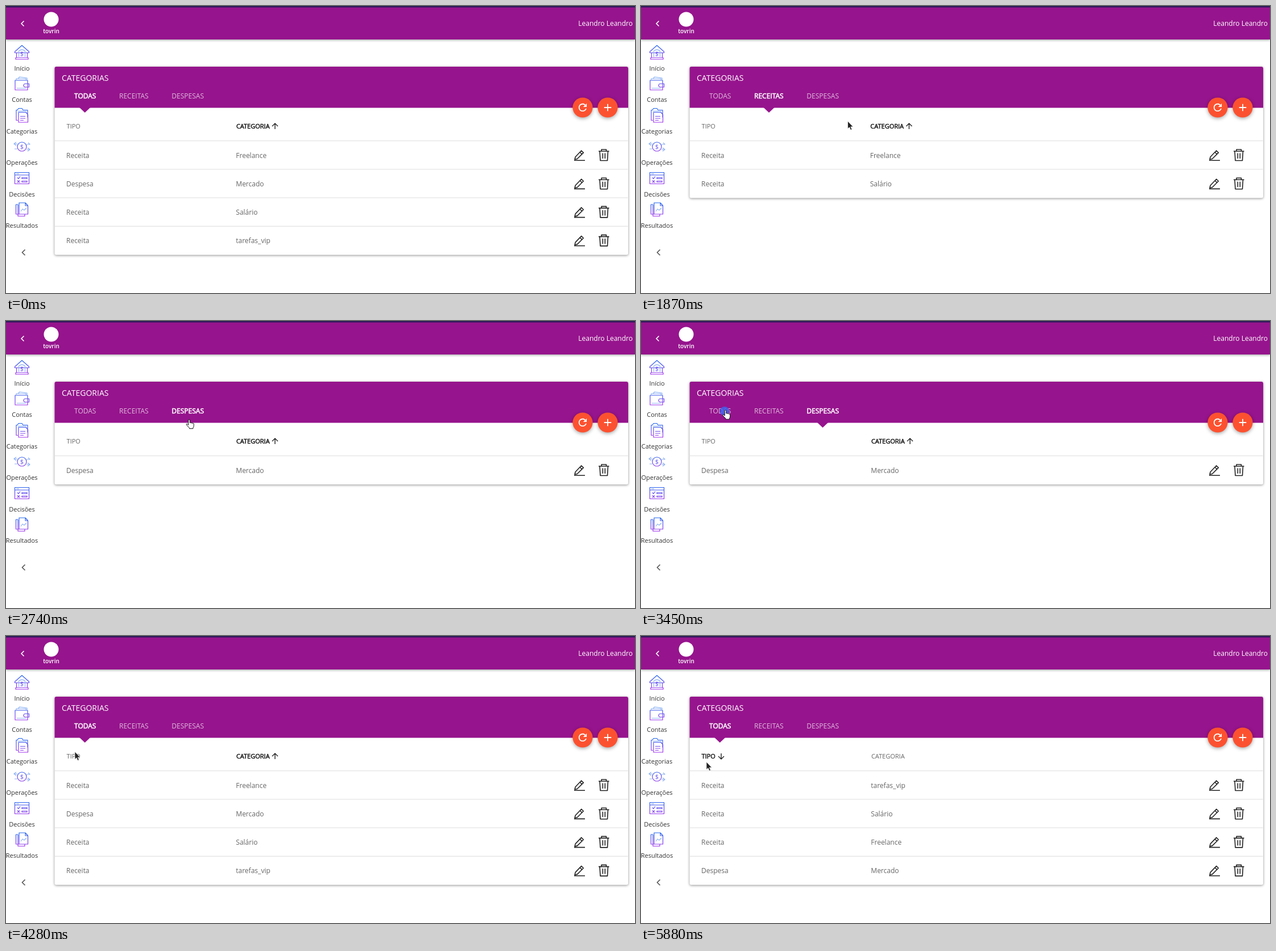
An HTML page for the animation above (6300 ms loop, 1106x506 px).

```html
<!DOCTYPE html>
<html lang="pt">
<head>
<meta charset="utf-8">
<title>Categorias</title>
<style>
html, body { margin: 0; width: 100%; height: 100%; overflow: hidden; background: #fff; }
svg { display: block; font-family: "Open Sans", "Noto Sans", sans-serif; font-size: 12px; }
.line { fill: none; stroke: #222; stroke-width: 1.6; stroke-linejoin: round; }
.side text { font-size: 11px; fill: #333; text-anchor: middle; }
.side path, .side circle { fill: none; stroke: url(#ink); stroke-width: 1.2; stroke-linejoin: round; }
.side .soft { stroke: #8fb4f5; }
.side .coin { font-size: 11px; fill: #6a5cf0; }
.tab { fill: #fff; opacity: .7; }
.tab.on { opacity: 1; stroke: #fff; stroke-width: .55px; }
.cell { fill: #666; }
.head { font-size: 11px; fill: #666; }
.head.on { fill: #111; stroke: #111; stroke-width: .45px; }
.card { filter: drop-shadow(0 1px 2px rgba(0,0,0,.45)); }
.fab { filter: drop-shadow(0 2px 3px rgba(0,0,0,.35)); }
</style>
</head>
<body>
<svg width="1106" height="506" viewBox="0 0 1106 506">
  <defs>
    <linearGradient id="ink" gradientUnits="userSpaceOnUse" x1="0" y1="-12" x2="0" y2="12">
      <stop stop-color="#2468ee"/><stop offset="1" stop-color="#a238ee"/>
    </linearGradient>
    <g id="tools" class="line">
      <path d="M1000 7.5l1.2-4.5L1011.700-8l3.600 3.600L1004.500 6.500zM1009-5.500l3.600 3.600M999 9.200H1018"/>
      <path d="M1042-7H1060.500M1047-7V-10H1055.500V-7M1044-7L1045 9.500H1057.500L1058.500-7M1049.300-3.500V6M1053.300-3.500V6"/>
    </g>
  </defs>

  <g style="filter:drop-shadow(0 1px 2px rgba(0,0,0,.4))">
    <rect width="1106" height="59" fill="#96148d"/>
    <rect width="1106" height="2.500" fill="#2d1b5a"/>
  </g>
  <path d="M31.500 26.500L27 31l4.500 4.500" fill="none" stroke="#fff" stroke-width="1.600"/>
  <circle cx="79.500" cy="23.500" r="13" fill="#fff"/>
  <text x="79.500" y="48" font-size="10" font-weight="600" fill="#fff" text-anchor="middle">tovrin</text>
  <text x="1102" y="35" fill="#fff" text-anchor="end">Leandro Leandro</text>

  <g class="side" id="side"></g>
  <path d="M33.500 429.500L28.500 434.500l5 5" fill="none" stroke="#555" stroke-width="1.600"/>

  <g id="table"></g>

  <g class="fab" fill="#fc5130"><circle cx="1014" cy="179" r="17.600"/><circle cx="1058" cy="179" r="17.600"/></g>
  <path transform="translate(1003.300 168.300) scale(.89)" fill="#fff" d="M17.650 6.350C16.200 4.900 14.210 4 12 4c-4.420 0-7.990 3.580-7.990 8s3.570 8 7.990 8c3.730 0 6.840-2.550 7.730-6h-2.080c-.82 2.330-3.040 4-5.650 4-3.310 0-6-2.690-6-6s2.690-6 6-6c1.660 0 3.140.69 4.220 1.780L13 11h7V4z"/>
  <path d="M1051.700 179h12.600M1058 172.700v12.600" stroke="#fff" stroke-width="1.800"/>

  <path id="marker" d="M-9.500 179H9.500L0 188z" fill="#96148d"/>
  <circle id="press" fill="#3f63ee"/>
  <g id="cursor">
    <path id="arrow" fill="#222" stroke="#fff" stroke-width=".7" d="M0 0V13.500l3-2.800 2.100 4.900 2.300-1-2.100-4.700h4.200z"/>
    <path id="hand" fill="#fff" stroke="#111" d="M-1.300 1a1.300 1.300 0 0 1 2.600 0V5.500q1.300-1 2.500.4 1.300-.8 2.400.5 1.600-.5 2 1v3.200q0 2-1.300 3.600v1.500h-6.500v-1.300L-4.600 9.300q-.8-1.800.9-1.900l2.400 2z"/>
  </g>
</svg>
<script>
const LOOP = 6300, VIEW_DELAY = 190, MARKER_DELAY = 330;
const $ = id => document.getElementById(id);

const menu = [
  ["Início", `<path d="M-12.500-1L0-12 12.500-1V1H-12.500zM-9.500 1V9M9.500 1V9M-11 9.500H11V12.500H-11z"/><path class="soft" d="M-5.500 8V-2Q0-7 5.500-2V8"/><text class="coin" y="6">$</text>`],
  ["Contas", `<path d="M-12-6H10V11H-12zM12.500 0H6a3 3 0 0 0 0 6H12.500z"/><path class="soft" d="M-10-6V-9H7V-6M-7-9L-4-12 9-10V-6M-9 8H7"/>`],
  ["Categorias", `<path d="M-7 9H-10V-9H-8L-6-12H0L2-9H10V4M-6-5H7L10.500-1V12.500H-6zM-3 2H6M-3 5.500H6M-3 9H3"/><path class="soft" d="M-7-7H8"/>`],
  ["Operações", `<circle r="8"/><path class="soft" d="M-8-5H-14M-10-8L-14-5l4 3M-8 4H-13M8 5H14M10 2l4 3-4 3M8-4H14L11-7"/><text class="coin" y="4">$</text>`],
  ["Decisões", `<path d="M-12.500-10H12.500V10H-12.500zM-12.500-5.500H12.500M-8-1l2 2 3-4M-8 4l4 4M-4 4l-4 4M0-1H9V1H0zM0 5H9V7H0z"/><path class="soft" d="M-10-7.700H-5"/>`],
  ["Resultados", `<path d="M-5 8H-10.500V-9H-7M-5-12H6L10.500-7V8H-5zM6-12V-7H10.500M-7-9V11.500H5V8"/><path class="soft" d="M-2 3L1-1l3 2 4-4"/>`]
];
$("side").innerHTML = menu.map(([label, icon], i) =>
  `<g transform="translate(28 ${81.5 + i * 55.5})">${icon}<text y="32">${label}</text></g>`).join("");

const tabs = [["TODAS", 120, 138.7], ["RECEITAS", 199, 225], ["DESPESAS", 291.3, 319.5]];
const items = [["Receita", "Freelance"], ["Despesa", "Mercado"], ["Receita", "Salário"], ["Receita", "tarefas_vip"]];

// Each view: active tab, sorted column, direction and item order.
const all = { tab: 0, sort: 1, up: true, order: [0, 1, 2, 3] };
const incomes = { tab: 1, sort: 1, up: true, order: [0, 2] };
const expenses = { tab: 2, sort: 1, up: true, order: [1] };
const typeUp = { tab: 0, sort: 0, up: true, order: [1, 2, 0, 3] };
const typeDown = { tab: 0, sort: 0, up: false, order: [3, 2, 0, 1] };

const clicks = [[1270, incomes], [2280, expenses], [3320, all], [4530, typeUp], [5180, typeDown]];

// Pointer stops: time, x, y.
const path = [
  [250, 388, 214], [710, 245.5, 162], [1500, 245.5, 162], [1820, 363.5, 203], [1890, 363.5, 203],
  [2250, 321, 161], [2600, 321, 161], [2740, 322, 174], [2890, 328, 206], [2980, 328, 206],
  [3300, 148.5, 157.5], [3800, 148.5, 157.5], [4270, 121, 204], [4320, 121, 204], [4490, 120, 207],
  [5750, 120, 207], [5810, 112, 216], [5880, 115, 222]
];

function tableMarkup({ tab, sort, up, order }) {
  const columns = [106, tab === 1 ? 402.7 : 404.3];
  const bottom = 238 + order.length * 50.2;
  const tabText = tabs.map(([label, x], i) =>
    `<text class="tab ${i === tab ? "on" : ""}" x="${x}" y="163">${label}</text>`).join("");
  const heads = ["TIPO", "CATEGORIA"].map((label, i) =>
    `<text class="head ${i === sort ? "on" : ""}" x="${columns[i] + .6}" y="216">${label}</text>`).join("");
  const arrowX = columns[sort] + (sort ? 68.7 : 35);
  const rows = order.map((item, i) => {
    const y = 263 + i * 50.2;
    return `<path d="M86 ${y - 25.3}H1093.500" stroke="#ddd"/>` +
      items[item].map((text, c) => `<text class="cell" x="${columns[c]}" y="${y + 4.5}">${text}</text>`).join("") +
      `<use href="#tools" y="${y}"/>`;
  }).join("");
  return `<rect class="card" x="85.500" y="107" width="1008.500" height="${bottom - 107}" rx="3" fill="#fff"/>
    <path d="M85.500 179.500V110a3 3 0 0 1 3-3H1091a3 3 0 0 1 3 3V179.500z" fill="#96148d"/>
    <text x="98" y="131.500" font-size="14" fill="#fff">CATEGORIAS</text>${tabText}${heads}
    <path d="M-5 0L0-5 5 0M0-4.500V5" transform="translate(${arrowX} 212) scale(1 ${up ? 1 : -1})" class="line" style="stroke-width:1.400"/>${rows}`;
}

function pointerAt(t) {
  const next = path.findIndex(p => p[0] > t);
  if (next < 0) return path[path.length - 1].slice(1);
  const [t0, x0, y0] = path[Math.max(0, next - 1)], [t1, x1, y1] = path[next];
  const u = Math.max(0, (t - t0) / (t1 - t0)), e = u * u * (3 - 2 * u);
  return [x0 + (x1 - x0) * e, y0 + (y1 - y0) * e];
}

let shown;
function draw() {
  const t = performance.now() % LOOP;
  let view = all, markerOn = true;
  for (const [start, target] of clicks) {
    const changed = start + VIEW_DELAY;
    if (t < changed) break;
    markerOn = target.tab === view.tab || t >= changed + MARKER_DELAY;
    view = target;
  }
  if (view !== shown) $("table").innerHTML = tableMarkup(shown = view);
  $("marker").setAttribute("transform", `translate(${tabs[view.tab][2]} 0)`);
  $("marker").style.display = markerOn ? "" : "none";

  const [x, y] = pointerAt(t);
  const overTab = y < 179 && x < 367;
  const overType = y >= 206 && y < 219 && x > 107 && x < 147;
  $("cursor").setAttribute("transform", `translate(${x} ${y})`);
  $("cursor").style.display = t < 250 ? "none" : "";
  $("hand").style.display = overTab || overType ? "" : "none";
  $("arrow").style.display = overTab || overType ? "none" : "";

  const click = clicks.find(([start]) => t >= start && t < start + 270);
  const age = click ? t - click[0] : 0;
  $("press").setAttribute("cx", x - 1.5);
  $("press").setAttribute("cy", y + 1.5);
  $("press").setAttribute("r", Math.min(12, age * .062));
  $("press").style.opacity = .85 * Math.min(1, (270 - age) / 110);
  requestAnimationFrame(draw);
}
draw();
</script>
</body>
</html>
```
